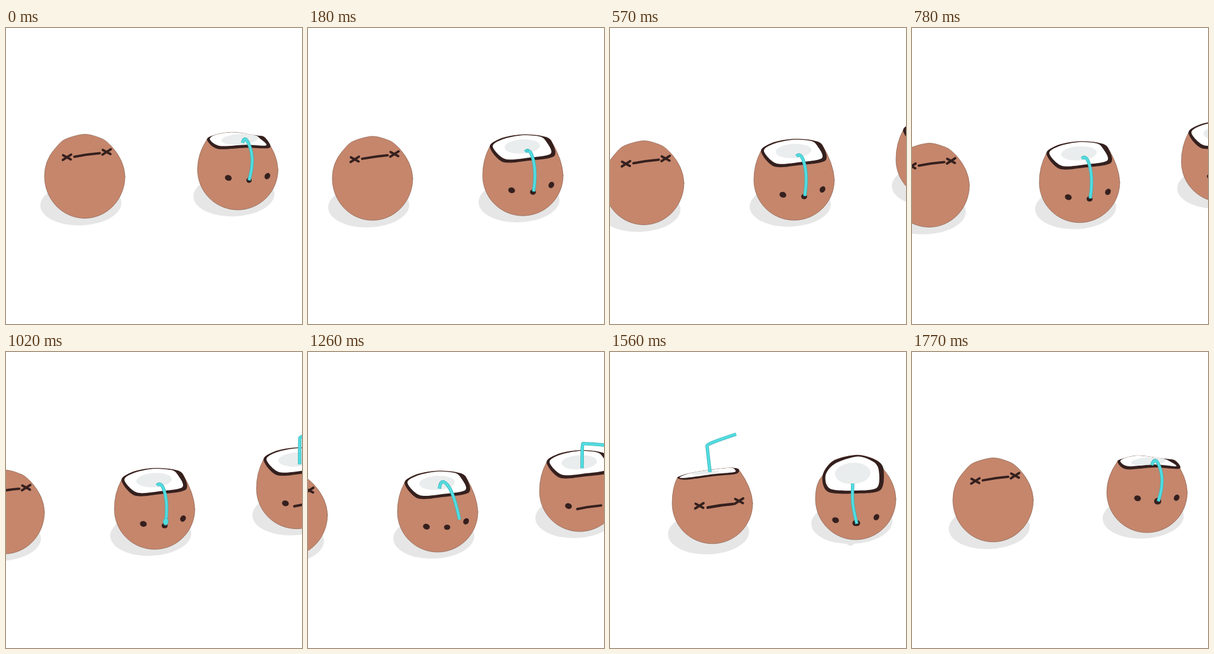
Animation, 500 px wide and 500 px high, one loop 1800 ms. Source, as an HTML page with a canvas:

```html
<!DOCTYPE html>
<html lang="en">
<head>
<meta charset="utf-8">
<title>Coconuts</title>
<style>
  html, body { margin: 0; width: 100%; height: 100%; overflow: hidden; background: #fff; }
  canvas { display: block; width: 100vmin; height: 100vmin; }
</style>
</head>
<body>
<canvas id="stage" width="500" height="500"></canvas>
<script>
const ctx = document.getElementById('stage').getContext('2d');
const LOOP = 1800, STEP = 30;
const BROWN = '#c5866c', EDGE = '#86604f', DARK = '#35201e', SHADE = '#e6e6e6';

// All coordinates are relative to the middle of the shell.
// rim: left, three along the top, right, three along the bottom
// lip: rim thickness at the top and bottom; mouth: x, y, half width, rise, thickness
// shadow: y of the shadow, y of the straw's own shadow
const rest = {
  off: [0, 0], ry: 68, shadow: [43, 60], lip: [1, 1],
  rim: [-56, -49, -36, -63, -2, -69, 30, -67, 47, -60, 53, -33, 8, -25, -34, -23],
  pulp: [-1, -49, 30, 12],
  straw: [5, -41, 5, -84, 6, -88, 53, -104],
  eyes: [-19, 25, 48, 16],
  mouth: [16, 27, 20, -3, 4.2]
};
const bend = { ...rest, straw: [4, -39, 4, -80, 6, -81, 55, -77] };
const down = {
  off: [-4, 7], ry: 69, shadow: [40, 75], lip: [2.5, 1],
  rim: [-56, -39, -38, -64, 3, -74, 35, -65, 47, -50, 42, -15, 0, -9, -47, -12],
  pulp: [-5, -43, 30, 18],
  straw: [-5, -26, -6, 0, -3, 22, 2, 42],
  eyes: [-34, 36, 35, 31],
  mouth: [1, 41, 1.5, 0, 10]
};
const up = {
  off: [6, -8], ry: 68, shadow: [42, 60], lip: [0, 1],
  rim: [-50, -52, -37, -58, -14, -62, 26, -57, 47, -54, 55, -40, 13, -42, -35, -39],
  pulp: [2, -52, 29, 7],
  straw: [8, -46, 14, -64, 30, -18, 19, 15],
  eyes: [-16, 10, 50, 9],
  mouth: [18, 15, .5, 0, 11]
};
const easing = {
  ...up, off: [4.5, -6.5], shadow: [43, 60],
  rim: [-52, -51, -37, -59, -7, -63, 28, -58, 45, -55, 54, -37, 13, -37, -34, -35],
  pulp: [3, -51, 31, 9],
  straw: [8, -45, 12, -61, 29, -16, 19, 18],
  eyes: [-16, 14, 50, 11],
  mouth: [19, 18, 0, 0, 9]
};
const sip = { ...rest, straw: [4, -40, 12, -48, 23, -5, 18, 27], mouth: [17, 28, .5, 0, 9] };
const release = { ...rest, straw: [3, -39, 5, -58, 27, -34, 37, 13], mouth: [16, 26, 1, 0, 8.5] };
const tip = {
  off: [-6, -20], ry: 68, shadow: [50, 60], lip: [0, .7],
  rim: [-59, -44, -38, -51, -8, -56, 30, -60, 44, -58, 40, -50, 2, -46, -45, -40],
  pulp: [-13, -52, 25, 3],
  straw: [-4, -53, -9, -95, -9, -101, 40, -117],
  eyes: [-22, 4, 45, -4],
  mouth: [13.5, 4, 21.5, -3, 4.5]
};
const fallen = {
  off: [-14, -30], ry: 71, shadow: [47, 60], lip: [0, 0],
  rim: [-50, -47, -34, -62, 0, -71, 30, -63, 45, -51, 30, -63, 0, -71, -34, -62],
  pulp: [0, -62, 20, 1],
  straw: [0, -40, 0, -50, 0, -50, 5, -50],
  eyes: [-30, -32, 37, -41],
  mouth: [4, -36, 21.5, -3, 4]
};
const timeline = [
  [0, rest], [1080, rest], [1260, bend], [1560, down], [1770, up], [1800, easing],
  [1980, sip], [2840, sip], [3060, release], [3360, tip], [3550, fallen], [6000, fallen]
];
const gulps = [[1950, 300], [2580, 252]];

function mix(a, b, k) {
  if (typeof a === 'number') return a + (b - a) * k;
  if (Array.isArray(a)) return a.map((v, i) => mix(v, b[i], k));
  return Object.fromEntries(Object.keys(a).map(n => [n, mix(a[n], b[n], k)]));
}

function poseAt(age) {
  const i = timeline.findIndex(key => key[0] > age);
  const [t0, a] = timeline[i - 1], [t1, b] = timeline[i];
  const k = (age - t0) / (t1 - t0);
  return mix(a, b, k * k * (3 - 2 * k));
}

const pairs = list => Array.from({ length: list.length / 2 }, (_, i) => [list[2 * i], list[2 * i + 1]]);

// Smooth curve through points, continuing the current path
function curve(pts, closed) {
  const n = pts.length;
  const at = i => closed ? pts[(i + n) % n] : pts[Math.max(0, Math.min(n - 1, i))];
  const handle = (p, a, b, s) => [p[0] + (b[0] - a[0]) * s, p[1] + (b[1] - a[1]) * s];
  if (closed) ctx.moveTo(...pts[0]);
  for (let i = 0; i < (closed ? n : n - 1); i++) {
    ctx.bezierCurveTo(
      ...handle(at(i), at(i - 1), at(i + 1), .15),
      ...handle(at(i + 1), at(i), at(i + 2), -.15),
      ...at(i + 1));
  }
}

function oval(x, y, rx, ry, turn, fill) {
  ctx.beginPath();
  ctx.ellipse(x, y, rx, ry, turn, 0, 7);
  ctx.fillStyle = fill;
  ctx.fill();
}

function stroke(width, color) {
  ctx.lineWidth = width;
  ctx.strokeStyle = color;
  ctx.stroke();
}

function drawShell(pose, rim) {
  const [L, R] = [rim[0], rim[4]];
  ctx.beginPath();
  ctx.ellipse(0, 0, 68, pose.ry, 0, 0, Math.PI);
  ctx.quadraticCurveTo(-68, -27, ...L);
  curve(rim.slice(0, 5));
  ctx.quadraticCurveTo(67, -27, 68, 0);
  ctx.closePath();
  ctx.fillStyle = BROWN;
  ctx.fill();
  stroke(.7, EDGE);
}

function drawOpening(pose, rim) {
  const inset = [[5, 0], [1, 2], [0, 1], [-2, 1], [-8, 2], [-6, -4], [0, -5], [4, -5]];
  const inner = rim.map(([x, y], i) => {
    const s = pose.lip[i > 0 && i < 4 ? 0 : 1];
    return [x + inset[i][0] * s, y + inset[i][1] * s];
  });
  ctx.beginPath();
  curve(rim, true);
  ctx.fillStyle = DARK;
  ctx.fill();
  ctx.save();
  ctx.beginPath();
  curve(inner, true);
  ctx.fillStyle = '#fff';
  ctx.fill();
  ctx.clip();
  oval(...pose.pulp, -.06, '#eaeded');
  ctx.restore();
}

function drawFace(pose, dead) {
  const [lx, ly, rx, ry] = pose.eyes;
  if (dead) {
    for (const [x, y] of [[lx, ly], [rx, ry]]) {
      ctx.beginPath();
      ctx.moveTo(x - 7, y + 4.5);
      ctx.lineTo(x + 7, y - 4.5);
      ctx.moveTo(x - 6.5, y - 3.5);
      ctx.lineTo(x + 6.5, y + 3.5);
      stroke(4, DARK);
    }
  } else {
    oval(lx, ly, 5.8, 4.8, .3, DARK);
    oval(rx, ry, 5.6, 4.5, -1, DARK);
  }
  const [x, y, half, rise, width] = pose.mouth;
  ctx.beginPath();
  ctx.moveTo(x - half - .01, y - rise);
  ctx.quadraticCurveTo(x, y - half * .06, x + half, y + rise);
  stroke(width, DARK);
}

function drawStraw(pose, age) {
  const [a, b, c, d] = pairs(pose.straw);
  const m = mix(b, c, .5);
  const trace = () => {
    ctx.beginPath();
    ctx.moveTo(...a);
    ctx.quadraticCurveTo(...b, ...m);
    ctx.quadraticCurveTo(...c, ...d);
  };
  ctx.lineCap = 'butt';
  trace();
  stroke(5.6, '#36abb0');
  trace();
  stroke(4.2, '#52dce0');
  ctx.lineCap = 'round';

  for (const [start, span] of gulps) {
    const u = (age - start) / span;
    if (u <= 0 || u >= 1) continue;
    const [p, q, r, k] = u < .5 ? [a, b, m, u * 2] : [m, c, d, u * 2 - 1];
    const [x, y] = mix(mix(p, q, k), mix(q, r, k), k);
    const size = Math.min(1, u * 3, .6 + (1 - u) * 2);
    oval(x, y, 6.3 * size, 8 * size, 0, '#52dce0');
    stroke(.7, '#36abb0');
  }
}

function drawCoconut(age) {
  const pose = poseAt(age);
  const rim = pairs(pose.rim);
  const behind = age > 3400;
  ctx.save();
  ctx.translate(523 - (age - 780) * 2 / 15 + pose.off[0], 226 + (age - 780) * .0193 + pose.off[1]);
  oval(-6.5, pose.shadow[0], 68.5, 36, -.04, SHADE);
  oval(-9, pose.shadow[1], 6, 4, 0, SHADE);
  if (behind) drawStraw(pose, age);
  drawShell(pose, rim);
  if (age < 3440) drawOpening(pose, rim);
  drawFace(pose, age > 3200);
  if (!behind) drawStraw(pose, age);
  ctx.restore();
}

const begin = performance.now();
function frame() {
  const t = Math.floor((performance.now() - begin) % LOOP / STEP) * STEP;
  ctx.clearRect(0, 0, 500, 500);
  ctx.lineCap = 'round';
  for (let i = 0; i < 3; i++) drawCoconut(t + i * LOOP);
  requestAnimationFrame(frame);
}
frame();
</script>
</body>
</html>
```
